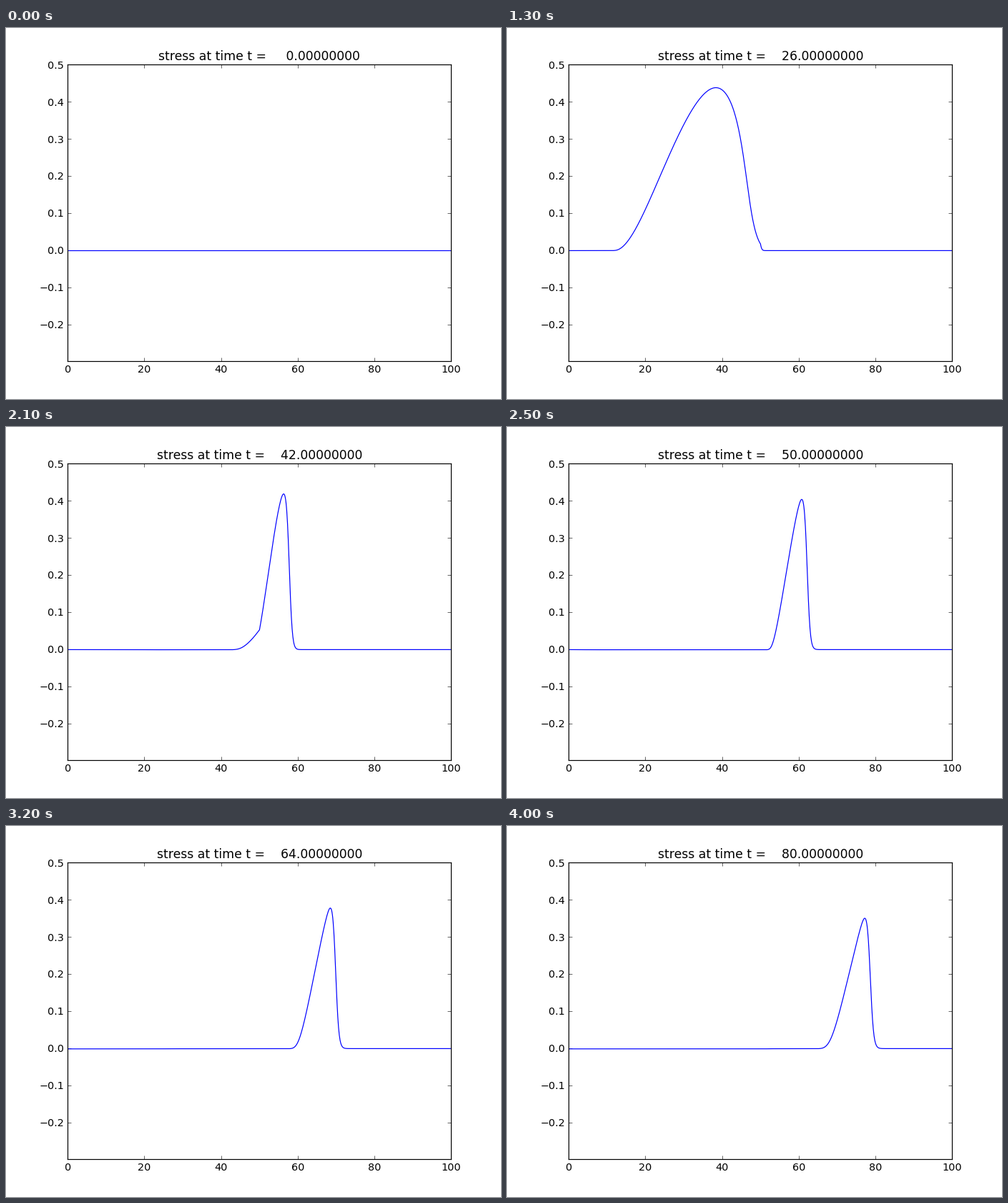
Animation, 692 px wide and 519 px high, one loop 4100 ms. Source, as a matplotlib script:

```python
import numpy as np
import matplotlib.pyplot as plt
from matplotlib.animation import FuncAnimation
from matplotlib.transforms import ScaledTranslation

FRAMES = 41
STEP = 2.0          # simulated time per frame
CELLS = 1000
LENGTH = 100.0
CFL = 0.9

WIDTH, HEIGHT, DPI = 692, 519, 86.5
NUDGE_X, NUDGE_Y = -0.35, 0.65   # pixel offset that sets how the frame snaps

dx = LENGTH / CELLS
x = (np.arange(CELLS) + 0.5) * dx

# Two materials with equal impedance; one ghost cell on each side.
left = np.concatenate(([True], x < LENGTH / 2, [False]))
rho = np.where(left, 1.0, 4.0)
bulk = np.where(left, 4.0, 1.0)


def stress(strain):
    return np.expm1(bulk * strain)


def wall_speed(t):
    """Velocity of the left wall: one smooth pull lasting 20 time units."""
    phase = (t - 10) / 10
    return -0.1 * (1 + np.cos(np.pi * phase)) if abs(phase) <= 1 else 0.0


def fill_ghosts(strain, mom, t):
    strain[0] = strain[1]
    mom[0] = 2 * rho[0] * wall_speed(t) - mom[1]
    strain[-1] = strain[-2]
    mom[-1] = mom[-2]


def advance(strain, mom, t, t_end):
    """First-order upwind f-wave steps of nonlinear elasticity."""
    while t < t_end - 1e-10:
        fill_ghosts(strain, mom, t)
        sig = stress(strain)
        speed = np.sqrt(bulk * (sig + 1) / rho)
        imp = rho * speed
        dt = min(CFL * dx / speed.max(), t_end - t)

        dsig = np.diff(sig)
        du = np.diff(mom / rho)
        total = imp[:-1] + imp[1:]
        back = -(dsig + imp[1:] * du) / total
        ahead = (dsig - imp[:-1] * du) / total

        k = dt / dx
        strain[1:-1] -= k * (back[1:] + ahead[:-1])
        mom[1:-1] -= k * imp[1:-1] * (back[1:] - ahead[:-1])
        t += dt


def simulate():
    strain = np.zeros(CELLS + 2)
    mom = np.zeros(CELLS + 2)
    curves = [np.zeros(CELLS)]
    for i in range(1, FRAMES):
        advance(strain, mom, (i - 1) * STEP, i * STEP)
        curves.append(stress(strain)[1:-1])
    return curves


curves = simulate()

plt.rcParams["font.family"] = "DejaVu Sans"
fig = plt.figure(figsize=(WIDTH / DPI, HEIGHT / DPI), dpi=DPI,
                 facecolor="white")
ax = fig.add_axes([0.125 + NUDGE_X / WIDTH, 0.1 + NUDGE_Y / HEIGHT,
                   0.775, 0.8])
ax.set_xlim(0, 100)
ax.set_ylim(-0.3, 0.5)
ax.set_xticks(range(0, 101, 20))
ax.set_yticks(np.arange(-2, 6) / 10)
ax.tick_params(direction="in", top=True, right=True, length=4, width=0.5,
               pad=4, labelsize=12)
for spine in ax.spines.values():
    spine.set_linewidth(1.0)

# The curve is not snapped to pixels, so it keeps its true position.
unshift = ScaledTranslation(-NUDGE_X / DPI, -NUDGE_Y / DPI,
                            fig.dpi_scale_trans)
line, = ax.plot(x, curves[0], color="blue", linewidth=1.0,
                transform=ax.transData + unshift)
title = ax.set_title("", fontsize=14.4, y=1.0, pad=5)


def draw(i):
    line.set_ydata(curves[i])
    title.set_text(f"stress at time t = {i * STEP:14.8f}")
    return line, title


anim = FuncAnimation(fig, draw, frames=FRAMES, interval=100, repeat=True,
                     repeat_delay=0, blit=False)
plt.show()
```
